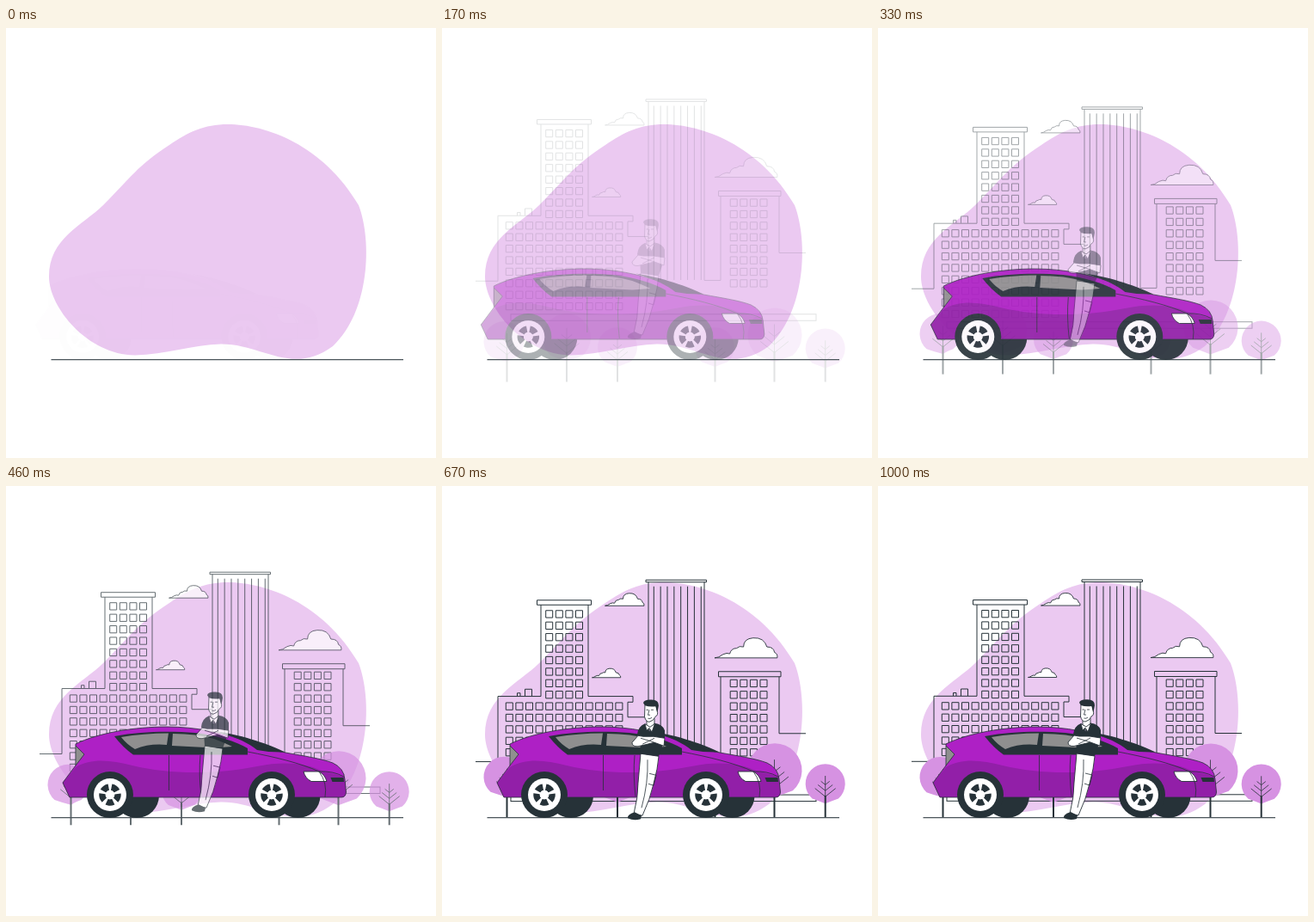
Recreate the animation shown at these times as an HTML page. Size 500 px wide and 500 px high, loop 1.04 s.

```html
<!DOCTYPE html>
<html lang="en">
<head>
<meta charset="utf-8">
<title>Man leaning on a car</title>
<style>
  html, body { margin: 0; height: 100%; overflow: hidden; background: #fff; }
  svg { display: block; width: 100vw; height: 100vh; }
  .line { fill: none; stroke: #263238; stroke-width: 1; }
  .thin { fill: none; stroke: #263238; stroke-width: .8; }
  .white { fill: #fff; stroke: #263238; stroke-width: .9; stroke-linejoin: round; }
  .ink { fill: #263238; }
  .glass { fill: #8f8f8f; }
  #clouds path { vector-effect: non-scaling-stroke; }
</style>
</head>
<body>
<svg viewBox="0 0 500 500">
  <defs>
    <path id="body" d="M79 300C105 287 148 280 185 280C220 280 248 287 270 294C290 301 305 307 323 310C345 314 365 317 378 322Q391 328 392 341L393.500 356Q393 362 388 362H72L64 345L79 325Z"/>
  </defs>
  <path fill="#ebc9f1" d="M258 112C302 112 369 136 410 206C426 248 423 330 380 370C333 405 297 367 250 367.5C218 368 185 380 150 380.5C95 380 50 325 50 289C50 245 88 230 113 206C147 172 152 161 190 136C212 121 230 112 258 112Z"/>

  <g id="city">
    <g class="line">
      <path d="M39 320.3H65V244.3H115V138H110.5V132.5H173.500V138H170V244.3H222V251H216V268.5H240M115 138H170"/>
      <path d="M96.5 244V236H104.5V244M87.5 244V240.5H91V244"/>
      <path d="M237 109H307.5V111.500H237ZM240 111.500V319M305 111.500V319.5H324V221.500H321.5V215.500H394V221.500H392V287.500H423M324 221.500H392"/>
      <rect x="80" y="358.800" width="355" height="7.500"/>
    </g>
    <path id="panes" class="line"/>
    <path id="ribs" class="line"/>
    <g id="clouds"></g>
  </g>

  <g id="trees"></g>
  <path d="M52.5 385.6H462" fill="none" stroke="#4a545a" stroke-width="1.1"/>

  <g id="car">
    <circle class="ink" cx="150" cy="360" r="26"/>
    <circle class="ink" cx="337.5" cy="360" r="26"/>
    <use href="#body" fill="#ae20c5"/>
    <path fill="#921fa8" d="M64 345L79 327C98 316 120 319 145 325C190 336 245 335 290 326C320 320 345 322 365 331L391.500 338L393.500 356Q393 362 388 362H72Z"/>
    <path class="glass" d="M79 302L89 312L79 325Z"/>
    <path class="ink" d="M124 291C155 285 190 285 218 287C244 290 265 297 279 305V312.500H146Q134 304 124 291Z"/>
    <path class="glass" d="M132 292Q158 287.500 187 287.500L185 301Q165 299 148 306Q138 300 132 292ZM192 288Q220 288 240 294Q253 299 261 303L240 304.500L191 302Z"/>
    <path class="ink" d="M244 285.500C275 290 305 301 323 309.500Q305 310 290 307C280 299 268 293 244 285.500Z"/>
    <path class="white" d="M344 332H362Q369 336 371 343.500H353Q346 340 344 332Z"/>
    <path class="ink" d="M375.500 339H390.500L391 344H377.500Z"/>
    <g class="thin">
      <use href="#body"/>
      <path d="M187.500 313V354M224 313Q222 335 225 361M279 309C310 315 340 322 362 332Q372 345 369 362M362 332Q378 331 391 338M79 302L89 312L79 325"/>
    </g>
    <g id="wheels"></g>
  </g>

  <g id="man">
    <path class="white" d="M231 311L252 314Q251 328 246 346Q242 364 233 383L223 381Q228 362 228 345Z"/>
    <path class="thin" d="M239 318Q240 345 232 374M241 334L249 336L246 348L240 346"/>
    <path class="ink" d="M224 379L232 383L231 387Q223 389.500 216 386Q215 382 224 379Z"/>
    <path class="white" d="M238 270V278L241 284L247 277V270Z"/>
    <path class="ink" d="M236 276L241 285L247 275.500Q257 277 259 284V294L252 314L231 311L230 295L227 289Q228 279 236 276Z"/>
    <path class="white" d="M236 276.500L238 284L241 281L244 286L247.500 276L242 280Z"/>
    <path class="white" d="M236 254L235.500 268Q237 274 241 274Q246 273 248 268Q252 266 250 261L248.500 254Z"/>
    <path class="ink" d="M234 252Q235 248 243 248.300Q252 248 252 255L250.500 263L248.500 256Q241 257 236 255Z"/>
    <path class="thin" d="M237.500 260H240M243 260H246M241 260L239.500 266H242M239.500 270Q242 271 244 269"/>
    <path class="white" d="M228 290L221 298Q221 303 228 302.500L247 298L258 302L259 293L246 291L234 291Z"/>
    <path class="thin" d="M231 293L241 296L247 298M233 300L247 293"/>
  </g>
</svg>

<script>
const $ = id => document.getElementById(id);
const range = n => [...Array(n).keys()];

// City details
const pane = (x, y) => `M${x} ${y}h8v8.3h-8z`;
const paneStep = 11.6;
let panes = '';
range(16).forEach(row => range(12).forEach(col => {
  if (row > 7 || (col > 3 && col < 8)) panes += pane(74.3 + col * paneStep, 144.5 + row * 13.4);
}));
range(8).forEach(row => range(4).forEach(col => {
  panes += pane(335.2 + col * paneStep, 225 + row * 13.4);
}));
$('panes').setAttribute('d', panes);
$('ribs').setAttribute('d', range(8).map(i => `M${246.3 + i * 7.85} 116.5V319`).join(''));

const cloud = (x, y, scale) => `<path class="white" transform="translate(${x} ${y}) scale(${scale})"
  d="M0 0Q3 0 6 -2.500Q9 -4 11 -3Q12 -7 16 -7Q18 -9 21 -8Q21 -14 28 -14.500Q36 -15 38 -8Q43 -8 43.500 -4Q46 -3 45.500 0Z"/>`;
$('clouds').innerHTML = cloud(189.5, 139, 1) + cloud(174.5, 222.5, .73) + cloud(317, 199.6, 1.6);

// Trees stand on the ground line
const tree = (x, y, r, trunk) => {
  const twigs = [.05, .35, .65].map((k, i) => {
    const w = r * (.22 + i * .15), b = y + r * k;
    return `M${trunk - w} ${b - w * .8}L${trunk} ${b}L${trunk + w} ${b - w * .8}`;
  }).join('');
  return `<path fill="#d692e2" d="M${x - r * .66} ${y + r * .75}A${r} ${r} 0 1 1 ${x + r * .66} ${y + r * .75}Q${x + r * .3} ${y + r * .88} ${trunk} ${y + r}Q${x - r * .3} ${y + r * .88} ${x - r * .66} ${y + r * .75}Z"/>
    <path class="thin" d="M${trunk} ${y - r * .4}V${y + r}${twigs}"/>
    <path class="line" style="stroke-width:2" d="M${trunk} ${y + r * .6}V385.500"/>`;
};
$('trees').innerHTML = [
  [72, 338.5, 23.5, 75.5], [145, 334, 28, 145], [204, 345, 23, 204],
  [317, 345, 23, 317.5], [387, 331, 31.5, 386.5], [445.7, 346.5, 23, 445.7]
].map(t => tree(...t)).join('');

const wheel = x => `<g transform="translate(${x} 359)">
  <circle class="ink" r="27"/><circle r="19" fill="#fff"/>
  <circle r="9" fill="none" stroke="#263238" stroke-width="7.500" pathLength="50"
    stroke-dasharray="7 3" transform="rotate(-79)"/>
  <circle r="5.300" fill="#fff"/></g>`;
$('wheels').innerHTML = wheel(119) + wheel(307);

// Timing curve that overshoots before settling
const cubic = (s, a, b) => 3 * (1 - s) ** 2 * s * a + 3 * (1 - s) * s * s * b + s ** 3;
function ease(x) {
  if (x >= 1) return 1;
  let lo = 0, hi = 1;
  for (let i = 0; i < 24; i++) {
    const mid = (lo + hi) / 2;
    if (cubic(mid, .36, .5) < x) lo = mid; else hi = mid;
  }
  return cubic(lo, -.01, 1.38);
}

function slide(id, dx, dy, p) {
  $(id).setAttribute('transform', `translate(${dx * (1 - p)} ${dy * (1 - p)})`);
  $(id).setAttribute('opacity', Math.max(0, Math.min(1, p)));
}

function draw() {
  const t = performance.now() % 1040 + 20;
  const slow = ease(t / 1000), fast = ease(t / 585);
  slide('city', 0, -30, slow);
  slide('man', 0, -30, slow);
  slide('trees', 0, 30, slow);
  slide('car', -30, 0, fast);
  requestAnimationFrame(draw);
}
draw();
</script>
</body>
</html>
```
